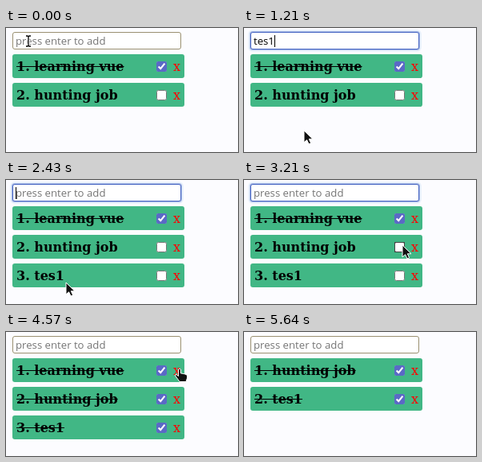
Animation of 290x156 px, one loop 5.71 s. Source, as an HTML page:

```html
<!DOCTYPE html>
<html lang="en">
<head>
<meta charset="utf-8">
<title>Todo list</title>
<style>
html, body { margin: 0; width: 100%; height: 100%; overflow: hidden; background: #fcfcff; }
body > *, .row > * { position: absolute; }
#field {
  left: 8px; top: 5px; width: 211px; height: 22px; box-sizing: border-box;
  padding-left: 3px; border: 1px solid #9a9070; border-radius: 3px; background: #fff;
  font: 13.2px/20px "Open Sans", sans-serif; white-space: pre; color: #000;
}
#field.empty { color: #757575; }
#field.focus { border-color: #4a68c4; box-shadow: 0 0 0 1px #9fb2e2, 0 0 0 3px #eaf2fc; }
#caret { top: 9px; width: 1px; height: 15px; background: #000; }
.row {
  left: 8px; width: 215px; height: 30px; border-radius: 3px; background: #41b785;
  font: bold 16px/32px "DejaVu Serif", serif; white-space: pre; color: #000;
}
.label { left: 5px; }
.done .label { text-decoration: line-through; }
.row input { left: 180px; top: 9px; width: 13px; height: 13px; margin: 0; accent-color: #5a69c6; }
.row input.hover { outline: 1px solid #444; outline-offset: -1px; border-radius: 2px; }
.remove { left: 201px; color: #f00; font-weight: normal; }
svg { left: 0; top: 0; overflow: visible; }
</style>
</head>
<body>
<div id="field"></div>
<div id="caret"></div>
<svg id="pointer" width="1" height="1">
  <g id="beam" fill="none">
    <path d="M-3-6H-1L0-5L1-6H3M0-5V6M-3 7H-1L0 6L1 7H3" stroke="#fff" stroke-width="3"/>
    <path d="M-3-6H-1L0-5L1-6H3M0-5V6M-3 7H-1L0 6L1 7H3" stroke="#000" stroke-width="1.3"/>
  </g>
  <path id="arrow" d="M0 0V15L3.6 11.8L6 17L8.6 15.8L6.3 10.8H11Z" fill="#111" stroke="#fff"/>
  <path id="hand" d="M-1.5 0Q0-2 1.5 0V5L4 5.3L7 6L9.5 7.5V11L8 15.5H0L-2.5 12L-5.5 8Q-5.5 6-4 6.5L-1.5 8.5Z" fill="#111" stroke="#fff"/>
</svg>
<script>
const LOOP = 5710, STEP = LOOP / 80;
const FOCUS = 140, ENTER = 2070, BLUR = 3285, REMOVE = 4850, LEAVE = 5240;
const keys = [["t", 780], ["te", 850], ["tes", 925], ["tes1", 995]];
const todos = [
  { text: "learning vue", from: 0, to: REMOVE, done: 0 },
  { text: "hunting job", from: 0, to: LOOP, done: 3285 },
  { text: "tes1", from: ENTER, to: LOOP, done: 3855 }
];
// Pointer stops: time, x, y
const path = [
  [0, 28, 16], [210, 28, 16], [640, 75, 129], [2480, 75, 129], [2710, 258, 112],
  [2860, 255, 106], [3140, 198, 82], [3420, 198, 82], [3700, 197, 120],
  [4070, 197, 120], [4340, 221, 76], [4500, 217, 47], [LOOP, 217, 47]
];
const $ = id => document.getElementById(id);
const show = (el, on) => el.style.display = on ? "" : "none";

for (const todo of todos) {
  const row = todo.row = document.createElement("div");
  row.className = "row";
  row.innerHTML = '<span class="label"></span><input type="checkbox" tabindex="-1"><span class="remove">x</span>';
  document.body.insertBefore(row, $("pointer"));
}

function pointerAt(t) {
  const i = path.findIndex(p => p[0] > t);
  const [t0, x0, y0] = path[i - 1], [t1, x1, y1] = path[i];
  const u = (t - t0) / (t1 - t0), k = u * u * (3 - 2 * u);
  return [x0 + (x1 - x0) * k, y0 + (y1 - y0) * k];
}

function drawField(t) {
  let text = "", since = t < ENTER ? FOCUS : ENTER;
  if (t < ENTER) for (const [typed, at] of keys) if (t >= at) [text, since] = [typed, at];
  const focused = t >= FOCUS && t < BLUR, field = $("field");
  field.textContent = text || "press enter to add";
  field.classList.toggle("empty", !text);
  field.classList.toggle("focus", focused);

  const range = document.createRange();
  range.selectNodeContents(field);
  $("caret").style.left = 12 + (text ? Math.round(range.getBoundingClientRect().width) : 0) + "px";
  show($("caret"), focused && (t - since) % 1200 < 600);
}

function drawRows(t, x, y) {
  let n = 0;
  for (const { text, from, to, done, row } of todos) {
    const visible = t >= from && t < to;
    show(row, visible);
    if (!visible) continue;
    const top = 33 + 36 * n++, box = row.children[1];
    row.style.top = top + "px";
    row.children[0].textContent = n + ". " + text;
    row.classList.toggle("done", t >= done);
    box.checked = t >= done;
    box.classList.toggle("hover", t < done && x >= 187 && x < 202 && y > top + 8 && y < top + 23);
  }
}

function drawPointer(t, x, y) {
  const shape = y < 28 ? "beam" : x > 208 && x < 220 && y < 56 ? "hand" : "arrow";
  for (const id of ["beam", "arrow", "hand"]) show($(id), id === shape);
  show($("pointer"), t < LEAVE);
  $("pointer").style.transform = `translate(${Math.round(x)}px, ${Math.round(y)}px)`;
}

function frame(now) {
  const t = Math.floor((now % LOOP + 8) / STEP) % 80 * STEP + 2;
  const [x, y] = pointerAt(t);
  drawField(t);
  drawRows(t, x, y);
  drawPointer(t, x, y);
  requestAnimationFrame(frame);
}
frame(0);
</script>
</body>
</html>
```
